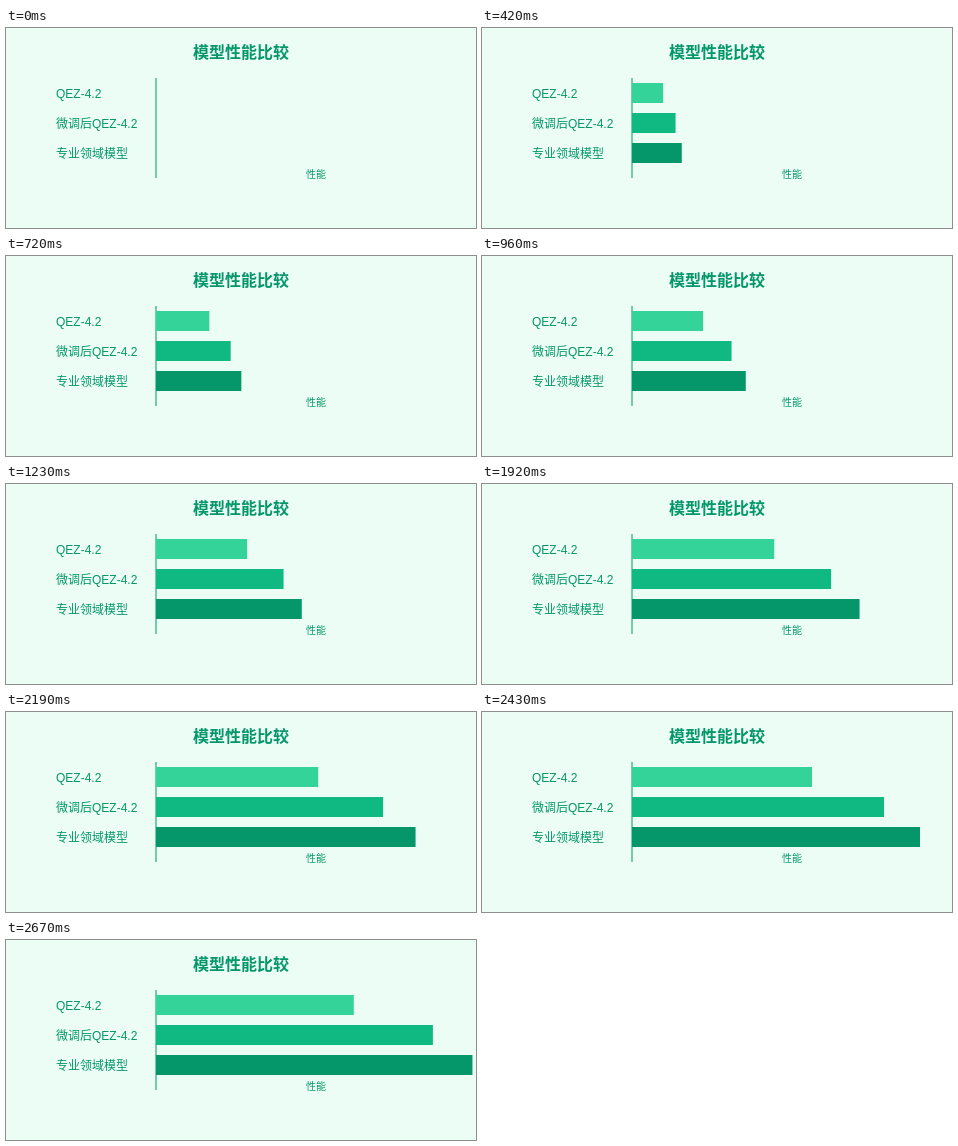
Recreate the animation shown at these times as an HTML page. Size 470x200 px, loop 2.7 s.

```html
<!DOCTYPE html>
<html lang="zh-CN">
<head>
<meta charset="utf-8">
<title>模型性能比较</title>
<style>
  html, body { margin: 0; width: 100%; height: 100%; overflow: hidden; background: #ecfdf5; }
  svg { display: block; width: 470px; height: 200px; }
  text { font-family: Arial, "Liberation Sans", "Noto Sans CJK SC", "Noto Sans CJK", sans-serif; font-size: 12px; fill: #059669; }
  .title { font-size: 16px; font-weight: bold; }
  .unit { font-size: 10px; }
</style>
</head>
<body>
<svg viewBox="0 0 470 200">
  <rect width="470" height="200" fill="#ecfdf5"/>
  <text class="title" x="235" y="30" text-anchor="middle">模型性能比较</text>
  <line x1="150" y1="50" x2="150" y2="150" stroke="#059669"/>
  <text x="50" y="70">QEZ-4.2</text>
  <text x="50" y="100">微调后QEZ-4.2</text>
  <text x="50" y="130">专业领域模型</text>
  <rect class="bar" data-full="200" x="150" y="55" width="0" height="20" fill="#34d399"/>
  <rect class="bar" data-full="280" x="150" y="85" width="0" height="20" fill="#10b981"/>
  <rect class="bar" data-full="320" x="150" y="115" width="0" height="20" fill="#059669"/>
  <text class="unit" x="310" y="150" text-anchor="middle">性能</text>
</svg>
<script>
  const LOOP = 2700, STEP = 30;
  const bars = [...document.querySelectorAll('.bar')];

  function draw(ms) {
    const t = Math.floor((ms % LOOP) / STEP) * STEP / LOOP;
    for (const bar of bars) bar.setAttribute('width', bar.dataset.full * t);
  }

  const start = performance.now();
  function tick(now) {
    draw(Math.max(0, now - start));
    requestAnimationFrame(tick);
  }
  draw(0);
  requestAnimationFrame(tick);
</script>
</body>
</html>
```
